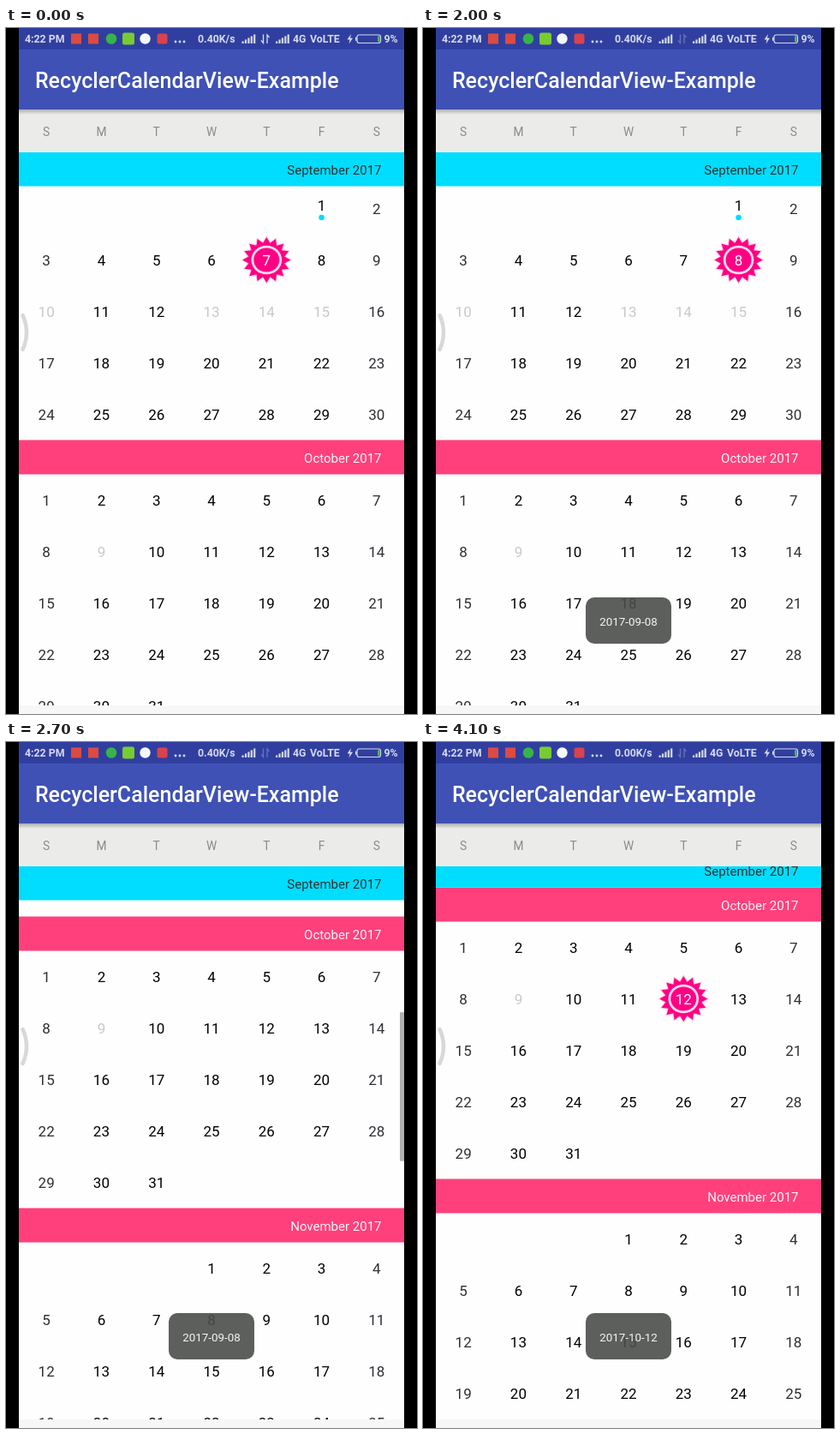
An HTML page with a canvas for the animation above (4.2 s loop, 480x800 px).

```html
<!DOCTYPE html>
<html lang="en">
<head>
<meta charset="utf-8">
<title>Calendar scroll</title>
<style>
html, body { margin: 0; width: 100%; height: 100%; overflow: hidden; background: #000; }
canvas { display: block; }
</style>
</head>
<body>
<canvas id="stage" width="480" height="800"></canvas>
<script>
const ctx = document.getElementById('stage').getContext('2d');
const LOOP = 4200, STEP = 100;
const LEFT = 15, WIDTH = 450, COL = WIDTH / 7;
const LIST_TOP = 145, LIST_END = 790, HEAD = 40, ROW = 60;
const PAPER = '#fdfefd', CYAN = '#00ddff', PINK = '#ff407d', HOT = '#ff0084';
const PALE = '#d6d9ee';

const months = [
  { name: 'September 2017', top: 141, first: 5, days: 30, off: [10, 13, 14, 15], dot: 1 },
  { name: 'October 2017', top: 481, first: 0, days: 31, off: [9] },
  { name: 'November 2017', top: 821, first: 3, days: 30, off: [] }
];

const between = (t, a, b) => t >= a && t < b;
const clamp = v => Math.max(0, Math.min(1, v));

function rect(x, y, w, h, color) {
  ctx.fillStyle = color;
  ctx.fillRect(x, y, w, h);
}

function round(x, y, w, h, r, color) {
  ctx.beginPath();
  ctx.roundRect(x, y, w, h, r);
  ctx.fillStyle = color;
  ctx.fill();
}

function oval(x, y, rx, ry, color) {
  ctx.beginPath();
  ctx.ellipse(x, y, rx, ry, 0, 0, Math.PI * 2);
  ctx.fillStyle = color;
  ctx.fill();
}

function line(points, color, width) {
  ctx.beginPath();
  points.forEach(([x, y]) => ctx.lineTo(x, y));
  ctx.strokeStyle = color;
  ctx.lineWidth = width;
  ctx.stroke();
}

function text(str, x, base, size, color, align = 'left', weight = 400) {
  ctx.font = `${weight} ${size}px Roboto, sans-serif`;
  ctx.textAlign = align;
  ctx.fillStyle = color;
  ctx.fillText(str, x, base);
}

// Drag for two steps, then a decelerating fling
function scrollAt(t) {
  if (t < 2300) return 118.5 * Math.pow(clamp((t - 2100) / 200), 1.13);
  return 118.5 + 192.5 * (1 - Math.pow(1 - clamp((t - 2300) / 700), 2.045));
}

function selectedAt(t) {
  if (t < 1700) return '0-7';
  return t < 3600 ? '0-8' : '1-12';
}

function pressedAt(t) {
  if (between(t, 1500, 1700)) return '0-8';
  if (between(t, 2100, 2400)) return '1-5';
  return between(t, 3400, 3600) ? '1-12' : '';
}

function badge(x, y) {
  const spikes = 16;
  ctx.beginPath();
  for (let i = 0; i < spikes * 2; i++) {
    const a = i * Math.PI / spikes;
    const r = i % 2 ? 0.76 : 1;
    ctx.lineTo(x + Math.cos(a) * 28 * r, y + Math.sin(a) * 26.5 * r);
  }
  ctx.closePath();
  ctx.strokeStyle = 'rgba(255, 160, 210, 0.55)';
  ctx.lineWidth = 2;
  ctx.stroke();
  ctx.fillStyle = HOT;
  ctx.fill();
  oval(x, y, 17.8, 16.8, '#ffdcee');
  oval(x, y, 15, 14, HOT);
}

function monthHead(name, y, color, ink) {
  rect(LEFT, y - 0.5, WIDTH, HEAD, color);
  text(name, 438.5, y + 26, 15, ink, 'right');
}

function drawDay(m, id, day, y, selected, pressed) {
  const cell = m.first + day - 1, col = cell % 7;
  const x = LEFT + (col + 0.5) * COL;
  const cy = y + HEAD + Math.floor(cell / 7) * ROW + ROW / 2;
  if (cy < 100 || cy > 830) return;
  const key = id + '-' + day;
  let color = col === 0 || col === 6 ? '#2e2e34' : '#000';
  if (m.off.includes(day)) color = '#c9c9c9';
  if (key === pressed) rect(x - COL / 2, cy - 27, COL, 53, '#ecedec');
  if (key === selected) {
    badge(x, cy - 0.5);
    color = '#fff';
  }
  const lift = m.dot === day ? 3.5 : 0;
  if (lift) oval(x, cy + 10, 3.3, 3.3, CYAN);
  text(day, x, cy + 5.8 - lift, 17, color, 'center');
}

function drawList(t) {
  const shift = scrollAt(t), selected = selectedAt(t), pressed = pressedAt(t);
  ctx.save();
  ctx.beginPath();
  ctx.rect(LEFT, LIST_TOP, WIDTH, LIST_END - LIST_TOP);
  ctx.clip();
  months.forEach((m, id) => {
    const y = m.top - shift;
    for (let d = 1; d <= m.days; d++) drawDay(m, id, d, y, selected, pressed);
    if (id) monthHead(m.name, y, PINK, '#fff3f7');
  });
  const sticky = Math.min(LIST_TOP, months[1].top - shift - HEAD);
  monthHead(months[0].name, sticky, CYAN, '#2b3335');
  if (between(t, 2200, 3000)) {
    const alpha = t < 2900 ? 0.3 : 0.15;
    rect(460, 226 + shift * 0.322, 5, 173.5, `rgba(0, 0, 0, ${alpha})`);
  }
  ctx.restore();
}

function drawHandle() {
  ctx.beginPath();
  ctx.moveTo(19.5, 335);
  ctx.quadraticCurveTo(28.5, 355, 19.5, 375);
  ctx.lineCap = 'round';
  ctx.lineWidth = 4.5;
  ctx.strokeStyle = 'rgba(165, 165, 160, 0.42)';
  ctx.stroke();
  ctx.lineCap = 'butt';
}

function signal(x) {
  for (let i = 0; i < 5; i++) {
    const h = 2.5 + i * 2;
    rect(x + i * 3.4, 18 - h, 2.2, h, PALE);
  }
}

function arrows(color) {
  line([[300.5, 7.5], [300.5, 17.5], [298, 14.5]], color, 1.3);
  line([[305, 18], [305, 8], [307.5, 11]], color, 1.3);
}

function drawStatus(t) {
  rect(LEFT, 0, WIDTH, 25, '#303f9f');
  const label = (s, x) => text(s, x, 17, 12.3, PALE, 'left', 700);
  label('4:22 PM', 22);
  rect(76, 6.5, 12, 12, '#dc4b43');
  rect(96, 6.5, 12, 12, '#dc4b43');
  oval(123, 12.5, 6.3, 6.3, '#36b44a');
  round(136, 5.5, 14, 14, 2.5, '#78cc32');
  oval(162.5, 12.5, 6.2, 6.2, '#f6f8ff');
  round(176.5, 6.5, 12, 12, 2.5, '#d8434f');
  for (let i = 0; i < 3; i++) oval(198 + i * 5, 16, 1.4, 1.4, PALE);
  label(t < 3800 ? '0.40K/s' : '0.00K/s', 224);
  signal(275.5);
  arrows(t < 300 ? PALE : '#6873b9');
  signal(315);
  label('4G', 335);
  label('VoLTE', 355);
  ctx.beginPath();
  [[403, 7], [398.5, 13.5], [401.5, 13.5], [400.5, 18.5], [405, 11.8], [402, 11.8]]
    .forEach(([x, y]) => ctx.lineTo(x, y));
  ctx.fillStyle = PALE;
  ctx.fill();
  ctx.beginPath();
  ctx.roundRect(410, 8, 27.5, 9.5, 2.5);
  ctx.strokeStyle = PALE;
  ctx.lineWidth = 1.2;
  ctx.stroke();
  rect(408, 10.8, 1.6, 4, PALE);
  rect(434.2, 9.5, 2.2, 6.5, '#54c45c');
  label('9%', 441.5);
}

function drawBars(t) {
  rect(LEFT, 95, WIDTH, 50, '#ebecea');
  const shade = ctx.createLinearGradient(0, 95, 0, 101);
  shade.addColorStop(0, 'rgba(0, 0, 0, 0.26)');
  shade.addColorStop(1, 'rgba(0, 0, 0, 0)');
  rect(LEFT, 95, WIDTH, 6, shade);
  [...'SMTWTFS'].forEach((d, i) =>
    text(d, LEFT + (i + 0.5) * COL, 125.7, 13.75, '#8a8b8a', 'center'));
  rect(LEFT, 25, WIDTH, 70, '#3f51b5');
  text('RecyclerCalendarView-Example', 34, 70, 25, '#fff', 'left', 500);
  drawStatus(t);
}

function toast(str, alpha, y) {
  if (alpha <= 0) return;
  ctx.globalAlpha = alpha;
  round(190, y, 100, 54, 10, 'rgba(76, 78, 76, 0.9)');
  text(str, 240, y + 33, 13.4, '#f4f5f4', 'center');
  ctx.globalAlpha = 1;
}

function drawToasts(t) {
  const restAt = shown => t < shown ? 664 : 666;
  const fadeIn = start => clamp((t - start) / 200);
  if (t < 3800) toast('2017-09-08', fadeIn(1700) * (t < 3700 ? 1 : 0.5), restAt(2100));
  else toast('2017-10-12', fadeIn(3800), restAt(4100));
}

function draw(t) {
  rect(0, 0, 480, 800, '#000');
  rect(LEFT, 0, WIDTH, 800, PAPER);
  drawList(t);
  rect(LEFT, LIST_END, WIDTH, 10, '#f6f7f6');
  drawBars(t);
  drawHandle();
  drawToasts(t);
}

const start = performance.now();
function tick() {
  const t = (performance.now() - start) % LOOP;
  draw(Math.floor(t / STEP) * STEP);
  requestAnimationFrame(tick);
}
tick();
</script>
</body>
</html>
```
